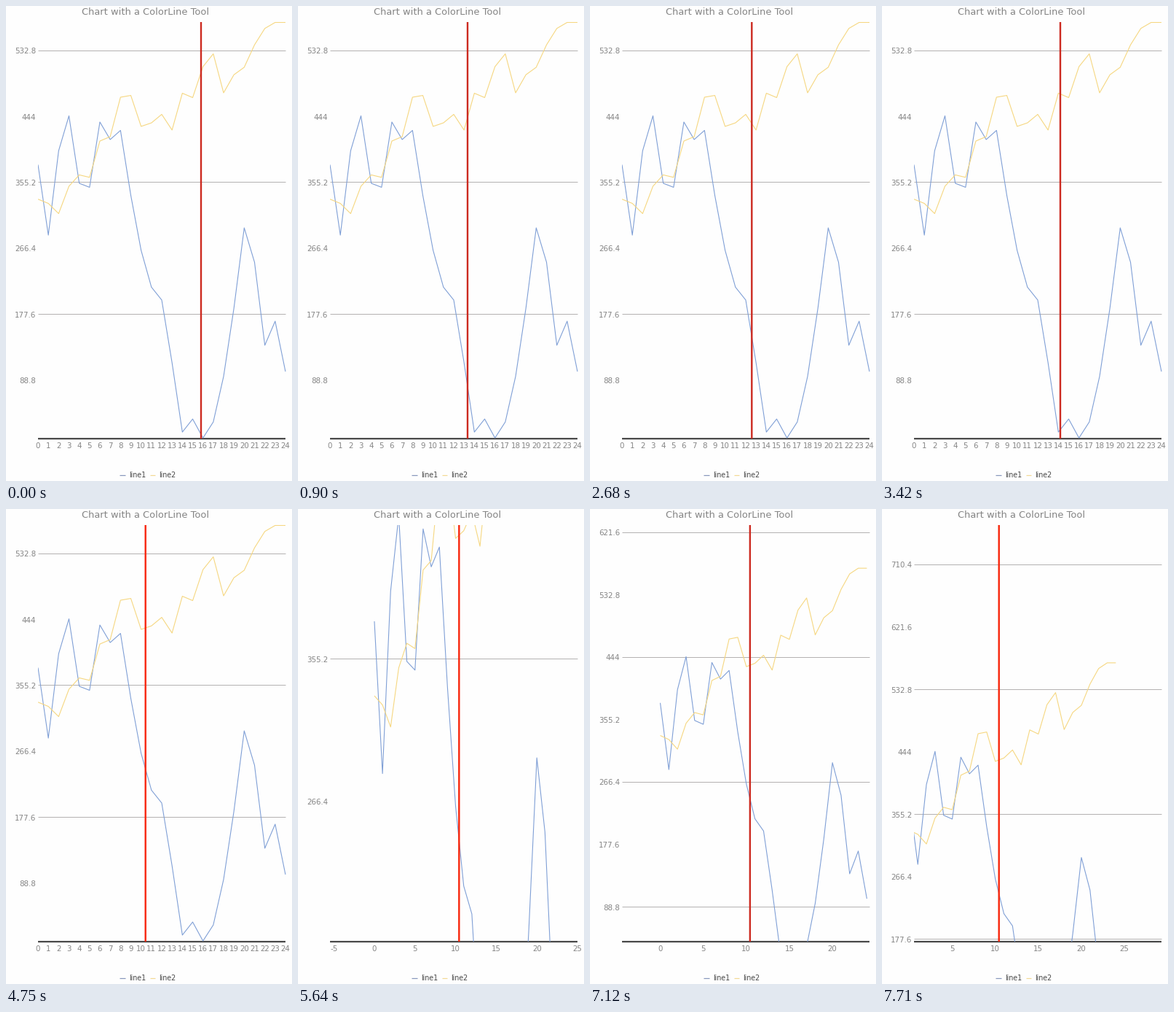
Recreate the animation shown at these times as a matplotlib script. Size 393 by 651 pixels, loop 8000 ms.

```python
import numpy as np
import matplotlib.pyplot as plt
from matplotlib.animation import FuncAnimation
from matplotlib.patches import Rectangle

W, H, DPI = 393, 651, 64
LOOP, TICK, STEPS = 8000, 40, 54
LEFT, RIGHT, TOP, BOTTOM = 44, 384, 22, 592
Y_STEP = 88.8
BLUE, YELLOW, GREY = "#7f9fd6", "#f6d780", "#858585"
DARK_RED, RED = "#cc2a20", "#f8260c"


def out(value, n):
    """Reach value in n points, fast then slow."""
    return value, n, lambda t: np.sin(t * np.pi / 2)


def into(value, n):
    """Reach value in n points, slow then fast."""
    return value, n, lambda t: 1 - np.cos(t * np.pi / 2)


def walk(start, *legs):
    points = [start]
    for leg in legs:
        value, n, ease = leg if isinstance(leg, tuple) else out(leg, 1)
        base = points[-1]
        points += [base + (value - base) * ease(k / n) for k in range(1, n + 1)]
    return np.array(points)


LINE1 = walk(378.6, 283.8, out(444.4, 2), 353.6, 348.2, 436.1, 412.5, 424.8,
             out(196.4, 4), 112, 18.6, 36.2, 10.7, into(293.6, 4),
             into(135.5, 2), 167.9, 100.1)
LINE2 = walk(332.2, into(312.8, 2), out(364.9, 2), 361.6, 410.5, 416.4, 469.5,
             471.9, 430.2, into(446.4, 2), 425.3, 474.9, 469, out(527.9, 2),
             475.4, out(509.8, 2), out(570.2, 3), 570.2)

# the dragged line bounces between two stops; distance covered per step
DRAG_MIN, DRAG_SPAN, DRAG_START = 48.5, 330, 219.5
DRAG_STEP = [0, 12, 14, 15, 23, 25, 32]
DRAG_PATH = [0, 808, 879.5, 879.5, 1343, 1343, 1682.7]

# visible range: step -> x min, x max, y min, y max
VIEW_STEP = [33, 38, 48, 52]
VIEWS = np.array([(0, 24, 10.7, 570.7),
                  (-5.46, 25, 179.6, 438.5),
                  (-4.44, 24.3, 40, 631.6),
                  (0.56, 29.3, 175, 766)])


def px(size):
    return size * 72 / DPI


def stroke(xs, ys, color, width, **kw):
    return ax.plot(xs, ys, color=color, lw=px(width),
                   solid_capstyle="butt", **kw)[0]


def label(x, y, text, size=10.3, color=GREY, ha="center"):
    return ax.text(x, y, text, fontsize=px(size), color=color, ha=ha,
                   va="baseline", family="DejaVu Sans")


fig = plt.figure(figsize=(W / DPI, H / DPI), dpi=DPI, facecolor="#fefefe")
ax = fig.add_axes([0, 0, 1, 1])
ax.set_xlim(0, W)
ax.set_ylim(H, 0)
ax.axis("off")

label(191.7, 12, "Chart with a ColorLine Tool", 13)
for x, name, color in ((156, "line1", "#8797bb"), (197.5, "line2", "#f3d993")):
    stroke([x, x + 7.5], [643, 643], color, 1.2)
    label(x + 12.8, 646.5, name, 9.5, "#484848", "left")

x_labels = {v: label(0, 606, str(v)) for v in range(-5, 31)}
y_labels = [label(41.2, 0, f"{i * Y_STEP:g}", ha="right") for i in range(10)]
grid = [stroke([LEFT, RIGHT - 0.5], [0, 0], "#b4b2b2", 1, zorder=1)
        for _ in y_labels]
stroke([LEFT - 0.5, RIGHT], [592.5, 592.5], "#484848", 2.2, zorder=2)

frame = Rectangle((LEFT - 0.5, TOP - 0.5), RIGHT - LEFT + 1, BOTTOM - TOP + 1,
                  transform=ax.transData)
series = [(data, stroke([], [], color, 1.1, zorder=3))
          for data, color in ((LINE1, BLUE), (LINE2, YELLOW))]
for _, line in series:
    line.set_clip_path(frame)
marker = stroke([0, 0], [TOP, 593], RED, 2.4, zorder=4, snap=False)


def drag_value(step):
    """Data value under the dragged line."""
    path = np.interp(step, DRAG_STEP, DRAG_PATH) - DRAG_START + DRAG_SPAN
    x = DRAG_MIN + abs(path % (2 * DRAG_SPAN) - DRAG_SPAN)
    return (x - LEFT) * 24 / (RIGHT - LEFT)


def draw(i):
    step = int((i * TICK + TICK - 1) * STEPS / LOOP)
    x0, x1, y0, y1 = (np.interp(step, VIEW_STEP, col) for col in VIEWS.T)

    def to_x(v):
        return LEFT + (v - x0) / (x1 - x0) * (RIGHT - LEFT)

    def to_y(v):
        return BOTTOM - (v - y0) / (y1 - y0) * (BOTTOM - TOP)

    for data, line in series:
        line.set_data(to_x(np.arange(len(data))), to_y(data))

    gap = 1 if x1 - x0 <= 24 else 5
    for v, text in x_labels.items():
        text.set_visible(v % gap == 0 and x0 - 1e-6 <= v <= x1 + 1e-6)
        text.set_x(to_x(v))

    # grid lines sit on every second value, counted from the top
    top = int(y1 // Y_STEP)
    for k, (text, rule) in enumerate(zip(y_labels, grid)):
        y = to_y(k * Y_STEP)
        shown = y0 <= k * Y_STEP <= y1
        text.set_visible(shown)
        text.set_y(y + 4.6)
        rule.set_visible(shown and (top - k) % 2 == 0)
        rule.set_ydata([y, y])

    marker.set_xdata([to_x(drag_value(step))] * 2)
    marker.set_color(DARK_RED if step < 26 or 42 <= step < 50 else RED)
    return []


anim = FuncAnimation(fig, draw, frames=LOOP // TICK, interval=TICK,
                     init_func=lambda: draw(0), repeat=True, repeat_delay=0)
plt.show()
```
